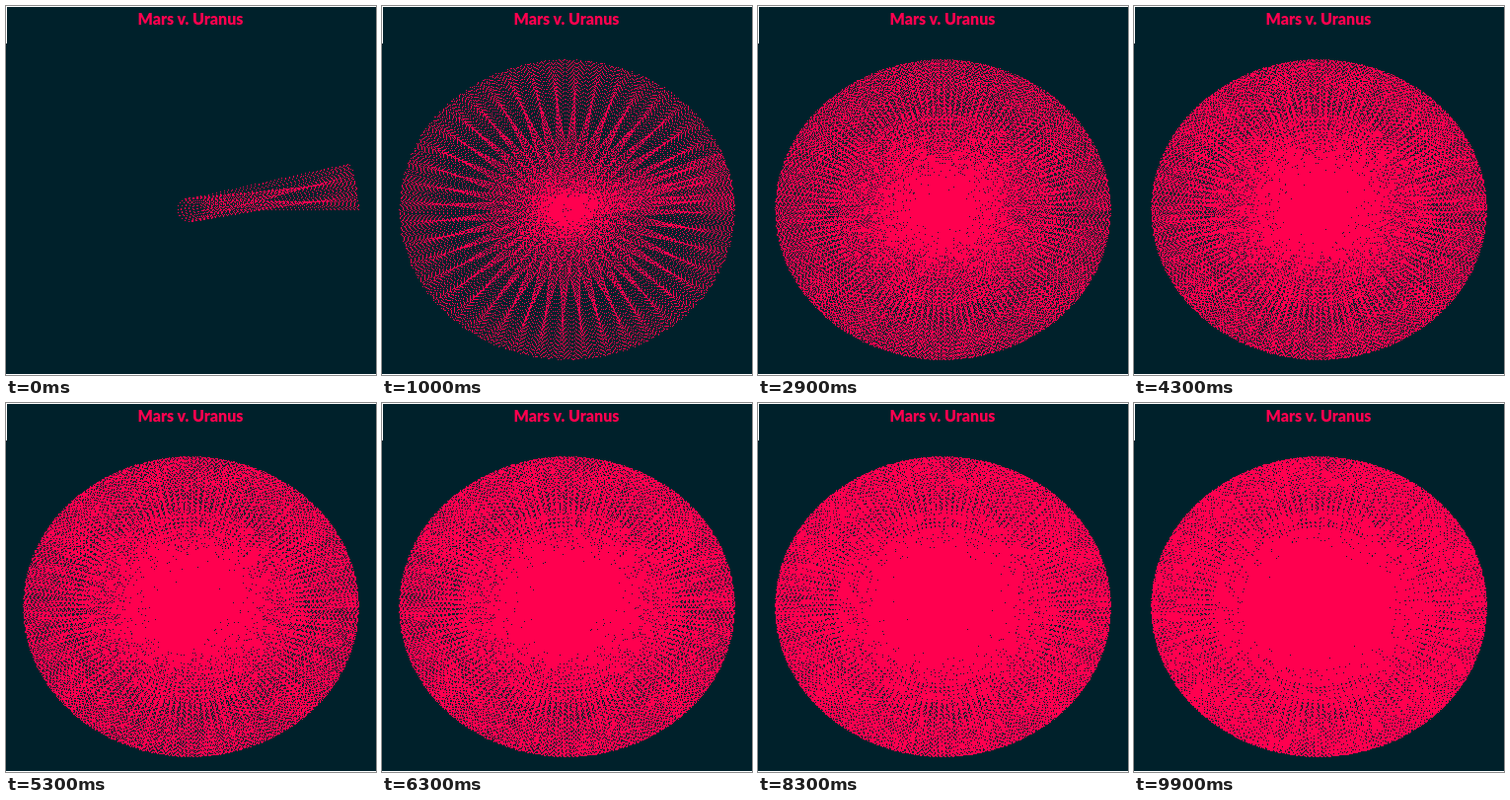
Animation, 375 px wide and 374 px high, one loop 10 s. Source, as an HTML page with a canvas:

```html
<!DOCTYPE html>
<html lang="en">
<head>
<meta charset="utf-8">
<title>Mars v. Uranus</title>
<style>
  html, body { margin: 0; width: 100%; height: 100%; overflow: hidden; background: #00212b; }
  canvas { display: block; }
  h1 {
    position: absolute; left: 0; top: 3px; width: 374px; margin: 0;
    font: 900 16px/20px Lato, "Open Sans", sans-serif;
    text-align: center; color: #ff004f;
  }
</style>
</head>
<body>
<canvas width="375" height="374"></canvas>
<h1>Mars v. Uranus</h1>
<script>
const W = 375, H = 374, FRAME = 100, FRAMES = 100;
const FIRST = 50, PER_FRAME = 100;         // lines in the first frame, lines added by each later one
const STEP = 0.365 * Math.PI / 180;        // outer planet's turn between two lines
const DOT_GAP = 4;
const PERIOD_RATIO = 84.01 / 1.881, ORBIT_RATIO = 1.524 / 19.19;
const RED = 0xff4f00ff, NAVY = 0xff2b2100, WHITE = 0xffffffff;  // ABGR

const ctx = document.querySelector("canvas").getContext("2d");
const image = ctx.createImageData(W, H);
const pixels = new Uint32Array(image.data.buffer);
let drawn = 0;

function clear() {
  pixels.fill(NAVY);
  pixels.fill(WHITE, 0, W);
  pixels.fill(WHITE, (H - 1) * W);
  for (let y = 0; y < 38; y++) pixels[y * W] = WHITE;
  drawn = 0;
}

function planet(angle, size) {
  return [
    187 + 170 * size * Math.cos(angle),
    206 - 152 * size * Math.sin(angle)
  ];
}

// Single pixels at even distances, counted from the first point
function dottedLine([x0, y0], [x1, y1]) {
  const dx = x1 - x0, dy = y1 - y0;
  const length = Math.hypot(dx, dy);
  for (let k = 0; k <= length; k += DOT_GAP) {
    const x = Math.round(x0 + dx * k / length);
    const y = Math.round(y0 + dy * k / length);
    pixels[y * W + x] = RED;
  }
}

function show(frame) {
  const count = FIRST + PER_FRAME * frame;
  if (count === drawn) return;
  if (count < drawn) clear();
  for (; drawn < count; drawn++) {
    const angle = drawn * STEP;
    dottedLine(planet(angle * PERIOD_RATIO, ORBIT_RATIO), planet(angle, 1));
  }
  ctx.putImageData(image, 0, 0);
}

function tick() {
  show(Math.floor(performance.now() / FRAME) % FRAMES);
  requestAnimationFrame(tick);
}

clear();
tick();
</script>
</body>
</html>
```
